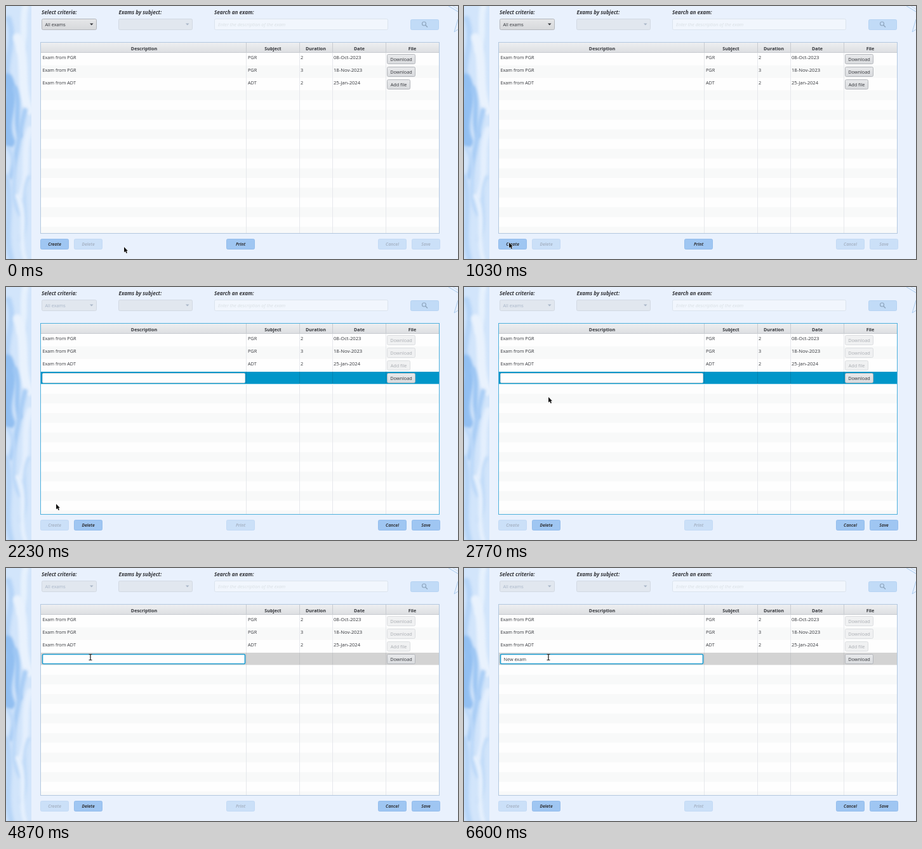
These frames come from a looping animation (712x400 px, 6810 ms). An HTML page with a canvas:

```html
<!DOCTYPE html>
<html lang="en">
<head>
<meta charset="utf-8">
<style>
html, body { margin: 0; width: 100%; height: 100%; overflow: hidden; background: #e9f1fd; }
canvas { display: block; }
</style>
</head>
<body>
<canvas id="stage" width="712" height="400"></canvas>
<script>
const W = 712, H = 400, LOOP = 6810;
const ctx = document.getElementById('stage').getContext('2d');
const FONT = '"Open Sans", "Noto Sans", sans-serif';
const INK = '#33353a', FADED = '#a9b6c8', GREY = '#b4b7bc', GRID = '#e6e8ec';

// Moments at which the interface changes
const CREATE = 2070, FOCUS = 3130;
const KEYS = [5100, 5240, 5390, 5500, 5970, 6080, 6200, 6310];
const MESSAGE = 'New exam';
const PATH = [[0, 186, 381], [60, 184, 381], [570, 107, 369], [850, 75, 373], [1100, 70, 375],
  [2130, 70, 375], [2400, 95, 290], [2700, 131, 181], [2770, 133, 174], [2830, 133, 172],
  [3050, 133, 141]];

const COLUMNS = [378.5, 462.5, 514.5, 598.5];
const ROWS = [
  ['Exam from PGR', 'PGR', '2', '08-Oct-2023', 'Download'],
  ['Exam from PGR', 'PGR', '3', '18-Nov-2023', 'Download'],
  ['Exam from ADT', 'ADT', '2', '25-Jan-2024', 'Add file']
];

function text(c, s, x, y, size, color = INK, style = '', align = 'left') {
  c.font = `${style} ${size}px ${FONT}`;
  c.fillStyle = color;
  c.textAlign = align;
  c.fillText(s, x, y);
}

function box(c, x, y, w, h, fill, border, r = 2, line = 1) {
  c.beginPath();
  c.roundRect(x + .5, y + .5, w - 1, h - 1, r);
  c.fillStyle = fill;
  c.fill();
  if (!border) return;
  c.strokeStyle = border;
  c.lineWidth = line;
  c.stroke();
}

function shade(c, y, h, top, bottom) {
  const g = c.createLinearGradient(0, y, 0, y + h);
  g.addColorStop(0, top);
  g.addColorStop(1, bottom);
  return g;
}

function polyline(c, points, color, width = 1) {
  c.beginPath();
  points.forEach(([x, y]) => c.lineTo(x, y));
  c.strokeStyle = color;
  c.lineWidth = width;
  c.stroke();
}

function vein(c, x1, y1, bend, x2, y2, width, color) {
  c.beginPath();
  c.moveTo(x1, y1);
  c.bezierCurveTo(x1 + bend, y1 + (y2 - y1) * .35, x2 - bend, y1 + (y2 - y1) * .65, x2, y2);
  c.strokeStyle = color;
  c.lineWidth = width;
  c.stroke();
}

function marble(c) {
  c.save();
  c.beginPath();
  c.rect(0, 0, 40, H);
  c.clip();
  c.fillStyle = '#d2e5fb';
  c.fillRect(0, 0, 40, H);
  c.filter = 'blur(2px)';
  c.lineCap = 'round';
  vein(c, 34, -10, -12, 22, 70, 10, '#e6f1fd');
  vein(c, 4, 20, 14, 6, 130, 9, '#b5d4f7');
  vein(c, 18, 50, 16, 36, 165, 14, '#e9f2fd');
  vein(c, 2, 115, 16, 6, 215, 17, '#92bff1');
  vein(c, 14, 130, 10, 22, 205, 8, '#9dc6f3');
  vein(c, 30, 165, -10, 8, 270, 8, '#a9cdf5');
  vein(c, 38, 195, -14, 24, 300, 10, '#e4effd');
  vein(c, 4, 225, 22, 22, 330, 6, '#bcd8f8');
  vein(c, 0, 270, 12, 8, 400, 9, '#b7d5f7');
  vein(c, 36, 270, -16, 24, 370, 5, '#bfdaf8');
  vein(c, 18, 300, 18, 34, 410, 6, '#e7f1fd');
  c.restore();
}

function makeBackdrop() {
  const canvas = document.createElement('canvas');
  canvas.width = W;
  canvas.height = H;
  const c = canvas.getContext('2d');
  c.fillStyle = '#e9f1fd';
  c.fillRect(0, 0, W, H);
  marble(c);
  polyline(c, [[697, 0], [712, 9]], '#a9cbee');
  polyline(c, [[704, 0], [712, 5]], '#c3daf3');
  polyline(c, [[712, 21], [706, 41], [712, 37]], '#a9cbee');
  [['Select criteria:', 56], ['Exams by subject:', 177.5], ['Search an exam:', 328]]
    .forEach(([s, x]) => text(c, s, x, 12.5, 8.1, INK, 'italic bold'));
  box(c, 328, 20, 274, 18, '#f1f6fd', '#dbe3ed');
  text(c, 'Enter the description of the exam', 334, 32, 7.3, '#d9dfe4', 'italic');
  box(c, 637, 21, 45, 17, '#c1dbf7', '#b6d3f3');
  c.beginPath();
  c.arc(658.5, 28, 3, 0, 7);
  c.strokeStyle = '#8fa6bf';
  c.lineWidth = 1.2;
  c.stroke();
  polyline(c, [[660.7, 30.2], [664, 33.5]], '#8fa6bf', 1.5);
  return canvas;
}
const backdrop = makeBackdrop();

function combo(x, w, label, on) {
  box(ctx, x, 20, w, 18, on ? shade(ctx, 20, 18, '#e6e7e9', '#d6d8db') : '#e1e7ef', on ? GREY : '#d2d9e3');
  text(ctx, label, x + 5.5, 32, 7.3, on ? INK : FADED);
  const ax = x + w - 11;
  ctx.beginPath();
  ctx.moveTo(ax, 27.5);
  ctx.lineTo(ax + 5.5, 27.5);
  ctx.lineTo(ax + 2.75, 30.5);
  ctx.fillStyle = on ? INK : FADED;
  ctx.fill();
}

function command(label, x, on) {
  box(ctx, x, 368, 45, 17, on ? '#9fc6f2' : '#cbe0f8', on ? '#94bdec' : '#c3daf5');
  text(ctx, label, x + 22.5, 379.3, 6.6, on ? INK : FADED, 'italic bold', 'center');
}

function fileButton(label, y, on) {
  const w = label === 'Download' ? 45 : 37;
  box(ctx, 600, y, w, 16, on ? shade(ctx, y, 16, '#e9eaec', '#d8dadd') : '#f0f1f2', on ? GREY : '#dcdee1');
  text(ctx, label, 600 + w / 2, y + 11, 7.3, on ? INK : '#aaadb2', '', 'center');
}

function table(editing, focused, typed, caret) {
  ctx.save();
  ctx.beginPath();
  ctx.rect(54, 57, 629, 303);
  ctx.clip();
  ctx.fillStyle = '#fefefe';
  ctx.fillRect(54, 57, 629, 303);

  // Filled rows are taller than the empty ones below them
  const filled = editing ? 4 : 3;
  for (let i = 0, y = 74; y < 360; i++) {
    const h = i < filled ? 19.8 : 15.4;
    if (i % 2) {
      ctx.fillStyle = '#f8f9f9';
      ctx.fillRect(54, y, 629, h);
    }
    y += h;
  }
  if (editing) {
    ctx.fillStyle = focused ? '#d3d3d3' : '#0096c9';
    ctx.fillRect(55, 134, 627, 19.3);
  }
  COLUMNS.forEach(x => {
    polyline(ctx, [[x, 74], [x, 360]], GRID);
    if (editing) polyline(ctx, [[x, 134], [x, 153]], focused ? '#c3c4c6' : '#0083b2');
  });

  ctx.fillStyle = shade(ctx, 57, 17, '#eff0f2', '#dcdee1');
  ctx.fillRect(54, 57, 629, 17);
  polyline(ctx, [[54, 73.5], [683, 73.5]], '#c8cbd0');
  COLUMNS.forEach(x => polyline(ctx, [[x, 58], [x, 73]], '#c8cbd0'));
  [['Description', 217.5], ['Subject', 420.5], ['Duration', 488], ['Date', 556.5], ['File', 640]]
    .forEach(([s, x]) => text(ctx, s, x, 69.7, 7.2, INK, 'bold', 'center'));

  ROWS.forEach(([name, subject, hours, date, file], i) => {
    const y = 84.3 + i * 19.9;
    text(ctx, name, 57.5, y, 7.25);
    text(ctx, subject, 381, y, 7.25);
    text(ctx, hours, 464, y, 7.25);
    text(ctx, date, 516, y, 7.65);
    fileButton(file, 76 + i * 20, !editing);
  });

  if (editing) {
    fileButton('Download', 136, true);
    box(ctx, 57, 136, 320, 16, '#fefefe', focused ? '#1a9bd0' : '#c9d3da', 1.5, focused ? 1.6 : 1);
    text(ctx, typed, 62.5, 146.7, 7.25);
    if (caret) {
      const x = 63 + ctx.measureText(typed).width;
      polyline(ctx, [[x, 139], [x, 149]], INK, .7);
    }
  }
  ctx.restore();
  ctx.strokeStyle = editing && !focused ? '#4fb0dc' : '#b3c8df';
  ctx.lineWidth = 1;
  ctx.strokeRect(54.5, 57.5, 628, 302);
}

function pointer(t) {
  let k = 0;
  while (k < PATH.length - 1 && PATH[k + 1][0] <= t) k++;
  const a = PATH[k], b = PATH[k + 1] || a;
  const p = b === a ? 0 : (t - a[0]) / (b[0] - a[0]);
  const x = a[1] + (b[1] - a[1]) * p, y = a[2] + (b[2] - a[2]) * p;
  ctx.save();
  ctx.translate(Math.round(x), Math.round(y));
  if (t > 2800 && y < 152) {
    polyline(ctx, [[-2.5, -4.5], [2.5, -4.5]], '#222');
    polyline(ctx, [[0, -4.5], [0, 4.5]], '#222', 1.3);
    polyline(ctx, [[-2.5, 4.5], [2.5, 4.5]], '#222');
  } else {
    const arrow = new Path2D('M0 0V8.5L2 6.8L3.5 10L5 9.3L3.6 6.2H6Z');
    ctx.strokeStyle = '#fff';
    ctx.lineWidth = 1;
    ctx.stroke(arrow);
    ctx.fillStyle = '#111';
    ctx.fill(arrow);
  }
  ctx.restore();
}

function draw(now) {
  const t = now % LOOP;
  const editing = t >= CREATE, focused = t >= FOCUS;
  const typed = MESSAGE.slice(0, KEYS.filter(k => k <= t).length);
  const caret = (t >= 4030 && t < 4530) || (t >= KEYS[0] && t < 6585);
  ctx.drawImage(backdrop, 0, 0);
  combo(56, 87, 'All exams', !editing);
  combo(177, 117, '', false);
  table(editing, focused, typed, caret);
  command('Create', 54, !editing);
  command('Delete', 107, editing);
  command('Print', 347, !editing);
  command('Cancel', 586, editing);
  command('Save', 639, editing);
  pointer(t);
}

const start = performance.now();
function tick() {
  draw(performance.now() - start);
  requestAnimationFrame(tick);
}
tick();
</script>
</body>
</html>
```
